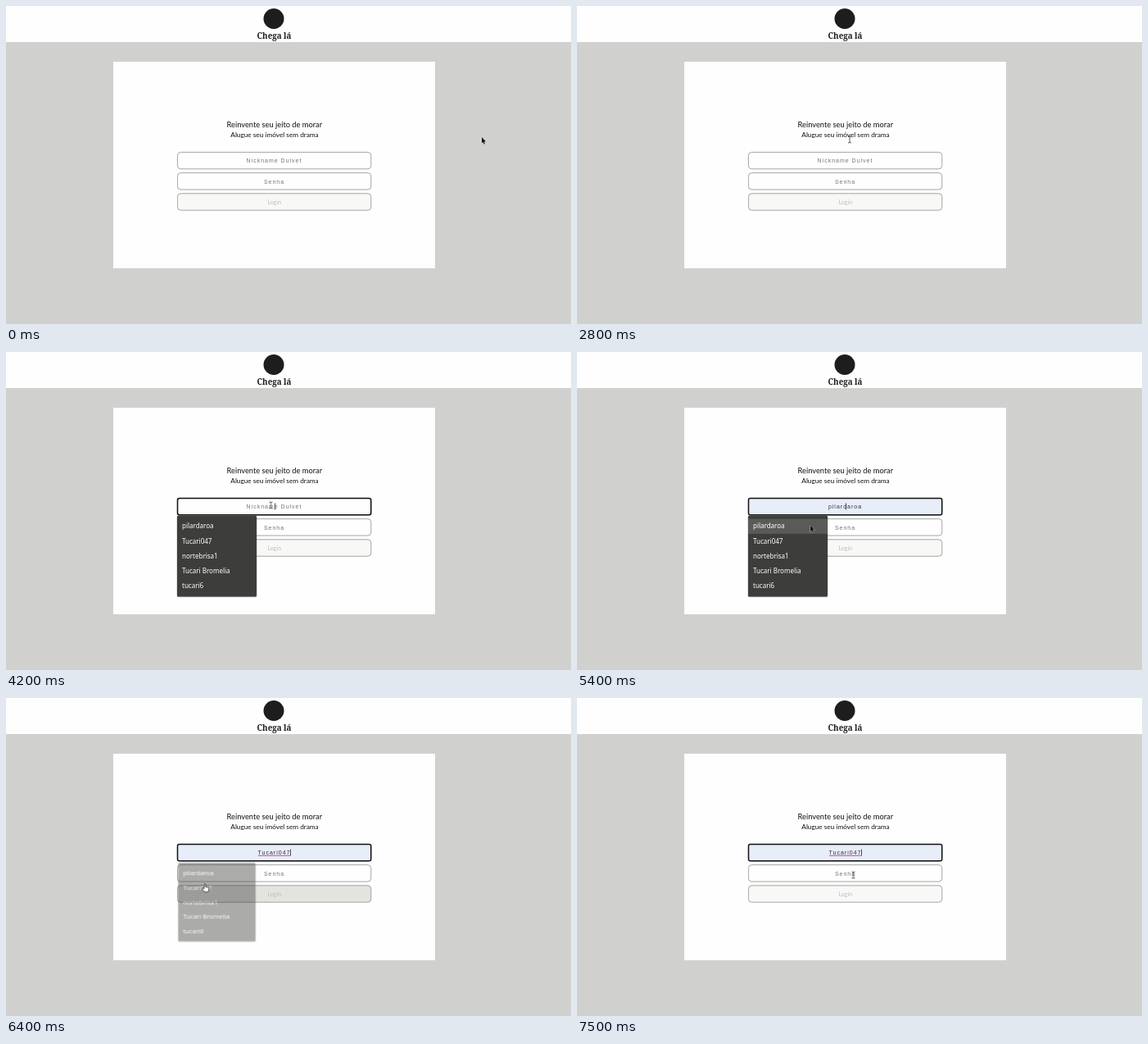
An HTML page that plays this animation: 690x388 px, repeating every 8000 ms.

```html
<!DOCTYPE html>
<html lang="pt">
<head>
<meta charset="utf-8">
<title>Login</title>
<style>
html, body { margin: 0; width: 100%; height: 100%; overflow: hidden; background: #d0d0ce; }
svg { display: block; width: 690px; height: 388px; }

/* Text */
text { text-anchor: middle; }
.brand { font: 700 9.8px "Noto Serif", serif; fill: #1d1d1d; }
.title { font: 9.3px Lato, sans-serif; fill: #111; }
.sub { font: 8.25px Lato, sans-serif; fill: #111; }
.field { font: 7px "Liberation Sans", Arial, sans-serif; letter-spacing: 1px; fill: #33343a; }
.hint { fill: #757575; }
.label { font: 7px Lato, sans-serif; fill: #bcbcba; }
.menu text { font: 500 8px "Noto Sans", sans-serif; text-anchor: start; fill: #fff; }

/* Shapes */
.box { fill: #fefefe; stroke: #8e8e8e; stroke-width: .8; }
.focus { fill: none; stroke: #111; stroke-width: 1.5; }
.caret { fill: #222; }
.row { fill: #5a5a58; }
.menu { transform-origin: 257.5px 249px; }

/* One shared 8 s clock; every change is a hard cut */
.a { animation: 8s step-end infinite; }
.hint1 { animation-name: until-preview; }
.focus { animation-name: focus; }
.filled { animation-name: filled; }
.pick0 { animation-name: first-pick; }
.pick1 { animation-name: second-pick; }
.chosen { animation-name: chosen; }
.row1 { animation-name: second-row; }
.caret0 { animation-name: caret-empty; }
.caret1 { animation-name: caret-end; }
.menu { animation-name: menu; }
.button { animation-name: button; }
.arrow { animation-name: arrow; }
.beam { animation-name: beam; }
.hand { animation-name: hand; }
.pointer { animation-name: pointer; }

@keyframes until-preview { 0% { opacity: 1 } 63.75%, 100% { opacity: 0 } }
@keyframes focus { 0% { opacity: 0 } 52.5%, 100% { opacity: 1 } }
@keyframes filled { 0% { opacity: 0 } 63.75%, 100% { opacity: 1 } }
@keyframes first-pick { 0%, 72.5%, 100% { opacity: 0 } 63.75% { opacity: 1 } }
@keyframes second-pick { 0%, 78.75%, 100% { opacity: 0 } 72.5% { opacity: 1 } }
@keyframes chosen { 0% { opacity: 0 } 78.75%, 100% { opacity: 1 } }
@keyframes second-row { 0%, 80%, 100% { opacity: 0 } 72.5% { opacity: 1 } }
@keyframes caret-empty { 0%, 58.75%, 78.75%, 100% { opacity: 0 } 52.5%, 65% { opacity: 1 } }
@keyframes caret-end { 0%, 87.5% { opacity: 0 } 78.75%, 93.75%, 100% { opacity: 1 } }
@keyframes menu {
  0%, 81.25%, 100% { opacity: 0; transform: none }
  52.5% { opacity: 1; transform: none }
  78.75% { opacity: .75; transform: scale(.99) }
  80% { opacity: .43; transform: scale(.972) }
}
@keyframes button {
  0%, 90%, 100% { fill: #f8f8f6 }
  78.75% { fill: #eeeeeb }
  80% { fill: #e3e4e0 }
  86.25% { fill: #eaeae7 }
  88.75% { fill: #f2f2ef }
}
@keyframes arrow { 0%, 61.25% { opacity: 1 } 31.25%, 78.75%, 100% { opacity: 0 } }
@keyframes beam { 0%, 61.25% { opacity: 0 } 31.25%, 86.25%, 100% { opacity: 1 } }
@keyframes hand { 0%, 86.25%, 100% { opacity: 0 } 78.75% { opacity: 1 } }

/* The pointer advances once every 100 ms (1.25%) */
@keyframes pointer {
  0% { transform: translate(581px, 160px) }
  12.5% { transform: translate(581px, 160px); animation-timing-function: steps(3, start) }
  16.25% { transform: translate(520px, 153px); animation-timing-function: steps(3, start) }
  20% { transform: translate(365px, 163px); animation-timing-function: steps(2, start) }
  22.5% { transform: translate(276px, 150px); animation-timing-function: steps(1, start) }
  23.75% { transform: translate(265px, 157px); animation-timing-function: steps(4, start) }
  28.75% { transform: translate(234px, 163px); animation-timing-function: steps(2, start) }
  31.25% { transform: translate(255px, 171px); animation-timing-function: steps(3, start) }
  35% { transform: translate(324px, 162px); animation-timing-function: steps(1, start) }
  36.25% { transform: translate(333px, 163px); animation-timing-function: steps(3, start) }
  40% { transform: translate(359px, 167px); animation-timing-function: steps(3, start) }
  43.75% { transform: translate(332px, 184px); animation-timing-function: steps(2, start) }
  46.25% { transform: translate(323.5px, 187px) }
  53.75% { transform: translate(323.5px, 187px); animation-timing-function: steps(3, start) }
  57.5% { transform: translate(323px, 189px); animation-timing-function: steps(5, start) }
  63.75% { transform: translate(313px, 203px); animation-timing-function: steps(4, start) }
  68.75% { transform: translate(285px, 211.5px); animation-timing-function: steps(2, start) }
  71.25% { transform: translate(268px, 214px); animation-timing-function: steps(3, start) }
  75% { transform: translate(247px, 226px); animation-timing-function: steps(2, start) }
  77.5% { transform: translate(243px, 226.5px) }
  83.75% { transform: translate(243px, 226.5px); animation-timing-function: steps(3, start) }
  87.5% { transform: translate(262px, 218px); animation-timing-function: steps(3, start) }
  91.25% { transform: translate(310px, 211px); animation-timing-function: steps(3, start) }
  95%, 100% { transform: translate(337.5px, 216px) }
}
</style>
</head>
<body>
<svg viewBox="0 0 690 388">
  <rect width="690" height="44" fill="#fefefe"/>
  <circle cx="327" cy="15.5" r="12.5" fill="#1d1d1d"/>
  <text class="brand" x="327.5" y="39.6">Chega lá</text>

  <rect x="131" y="68" width="393" height="252" fill="#fefefe"/>
  <text class="title" x="327.8" y="148">Reinvente seu jeito de morar</text>
  <text class="sub" x="328" y="159.6">Alugue seu imóvel sem drama</text>

  <!-- Nickname -->
  <rect class="box" x="209.4" y="178.4" width="236.4" height="20.4" rx="4"/>
  <rect class="a filled" x="209.5" y="178.5" width="236" height="20.2" rx="2" fill="#e7eef9"/>
  <rect class="a focus" x="209.5" y="178.4" width="236.2" height="20.4" rx="2"/>
  <text class="a field hint hint1" x="327.5" y="191.1">Nickname Dulvet</text>
  <text class="a field pick0" x="327.5" y="191.1">pilardaroa</text>
  <text class="a field pick1" x="327.5" y="191.1">Tucari047</text>
  <g class="a chosen">
    <text class="field" x="327.5" y="191.1" style="fill:#4a2038">Tucari047</text>
    <rect x="308" y="191.9" width="39" height=".8" fill="#c0305a"/>
  </g>
  <rect class="a caret caret0" x="328" y="184.5" width=".8" height="8"/>
  <rect class="a caret caret1" x="347" y="184.5" width=".8" height="8"/>

  <!-- Password and button -->
  <rect class="box" x="209.4" y="203.6" width="236.4" height="20.4" rx="4"/>
  <text class="field hint" x="327.5" y="216.5">Senha</text>
  <rect class="a box button" x="209.4" y="228.8" width="236.4" height="20.4" rx="4"/>
  <text class="label" x="327.8" y="241.6">Login</text>

  <!-- Suggestions -->
  <g class="a menu">
    <rect x="208.5" y="200" width="98" height="99.3" rx="2" fill="#000" opacity=".25"/>
    <rect x="209" y="199.6" width="97" height="98.8" rx="1.5" fill="#3d3d3b"/>
    <rect class="a row pick0" x="209" y="203.6" width="97" height="18.2"/>
    <rect class="a row row1" x="209" y="221.8" width="97" height="18.2"/>
    <text x="215" y="215.4">pilardaroa</text>
    <text x="215" y="233.6">Tucari047</text>
    <text x="215" y="251.8">nortebrisa1</text>
    <text x="215" y="270">Tucari Bromelia</text>
    <text x="215" y="288.2">tucari6</text>
  </g>

  <g class="a pointer">
    <path class="a arrow" d="M0 0V7.6L1.7 6L2.8 8.8L4 8.3L2.9 5.6H5.2Z" fill="#111" stroke="#fff" stroke-width=".6" paint-order="stroke"/>
    <path class="a beam" d="M-2-4Q0-4 0-3V3Q0 4-2 4M2-4Q0-4 0-3M2 4Q0 4 0 3" fill="none" stroke="#333" stroke-width=".8"/>
    <path class="a hand" d="M-.9 .8Q0-.6 .9 .8V4Q4.8 4 4.8 5.5V8Q4.8 9.8 3.5 10H-.8Q-3 7.5-3.8 6Q-3.4 4.8-.9 6.2Z" fill="#fff" stroke="#222" stroke-width=".8"/>
  </g>
</svg>
</body>
</html>
```
